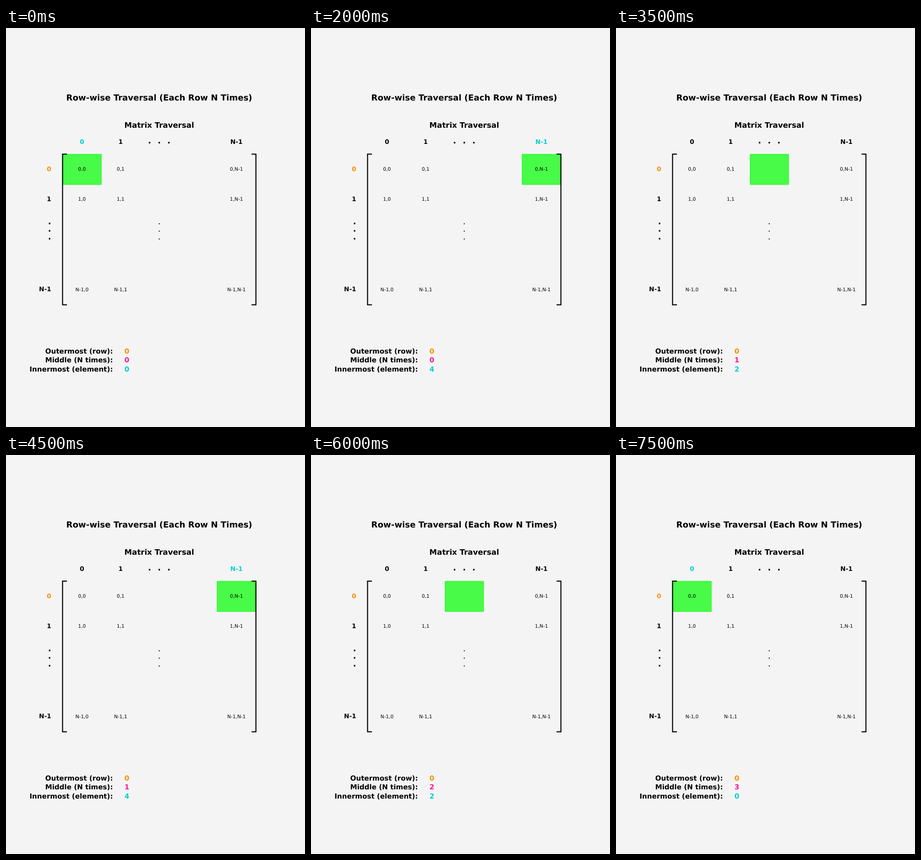
These frames come from a looping animation (648 by 864 pixels, 8000 ms). An HTML page:

```html
<!DOCTYPE html>
<html lang="en">
<head>
<meta charset="utf-8">
<title>Row-wise Traversal</title>
<style>
  html, body { margin: 0; width: 100%; height: 100%; overflow: hidden; background: #f4f4f4; }
  svg { display: block; width: 648px; height: 864px; }
  text { font-family: "DejaVu Sans", sans-serif; text-rendering: geometricPrecision; white-space: pre; }
  .bold { font-weight: 700; }
  .cell { fill: #0f0; stroke: #0f0; stroke-width: 1.5; fill-opacity: .7; stroke-opacity: .7; }
  .bracket { fill: none; stroke: #000; stroke-width: 2.25; stroke-linecap: square; }
</style>
</head>
<body>
<svg id="stage" viewBox="0 0 648 864"></svg>
<script>
const STEP = 500, STEPS = 16, COLS = 5;
const ORANGE = '#ff8c00', PINK = '#ff1493', TEAL = '#00ced1';
const LABELS = { 0: '0', 1: '1', 4: 'N-1' };
const stage = document.getElementById('stage');

// Grid units to pixels; whole numbers are cell centres
const gx = c => 164.7 + 83.7 * c;
const gy = r => 305.88 + 65.22 * r;
// Edges sit on a finer pixel grid, scaled to the stage
const snap = (v, shift) => (Math.floor(v / 0.54 + 0.5) + shift) * 0.54;

function add(tag, attrs, content = '') {
  const el = document.createElementNS('http://www.w3.org/2000/svg', tag);
  for (const k in attrs) el.setAttribute(k, attrs[k]);
  el.textContent = content;
  return stage.appendChild(el);
}

function label(content, x, y, size, anchor = 'middle', bold = true, fill = '#000') {
  return add('text', {
    x, y, fill, 'font-size': size, 'text-anchor': anchor, class: bold ? 'bold' : ''
  }, content);
}

const midline = (r, size) => gy(r) + 0.276 * size;

const top0 = snap(gy(-0.5), 0.5);
const cell = add('rect', { class: 'cell', y: top0, height: snap(gy(0.5), 0.5) - top0 });

function bracket(edge, tip) {
  const x = snap(edge, 0), top = snap(gy(-0.5), 0), bottom = snap(gy(4.5), 0);
  add('path', { class: 'bracket', d: `M${x + tip} ${top}H${x}V${bottom}H${x + tip}` });
}
bracket(gx(-0.5), 8.37);
bracket(gx(4.5), -8.37);

label('Row-wise Traversal (Each Row N Times)', gx(2), 157.4, 18);
label('Matrix Traversal', gx(2), 216.2, 16.5);

const heads = {};
for (const i in LABELS) {
  heads[i] = label(LABELS[i], gx(+i), 251.1, 13.5);
  label(LABELS[i], 97.9, midline(+i, 13.5), 13.5, 'end', true, i === '0' ? ORANGE : '#000');
  for (const j in LABELS) {
    label(`${LABELS[i]},${LABELS[j]}`, gx(+j), midline(+i, 10.5), 10.5, 'middle', false);
  }
}

for (const d of [-0.25, 0, 0.25]) {
  label('.', gx(2 + d), 250, 18);
  label('.', 97.9, midline(2 + d, 18), 18, 'end');
  label('.', gx(2), midline(2 + d, 18), 18, 'middle', false);
}

const counters = [
  ['Outermost (row):', 6.05, ORANGE],
  ['Middle (N times):', 6.35, PINK],
  ['Innermost (element):', 6.65, TEAL]
].map(([name, r, color]) => {
  label(name, 231.66, midline(r, 15), 15, 'end');
  return label('0', 256.77, midline(r, 15), 15, 'start', true, color);
});

function draw(step) {
  const col = step % COLS;
  const left = snap(gx(col - 0.5), 0.5);
  cell.setAttribute('x', left);
  cell.setAttribute('width', snap(gx(col + 0.5), 0.5) - left);
  for (const i in heads) heads[i].setAttribute('fill', +i === col ? TEAL : '#000');
  counters[1].textContent = Math.floor(step / COLS);
  counters[2].textContent = col;
}

const start = performance.now();
let shown = -1;
function tick() {
  const step = Math.floor((performance.now() - start) / STEP) % STEPS;
  if (step !== shown) draw(shown = step);
  requestAnimationFrame(tick);
}
tick();
</script>
</body>
</html>
```
